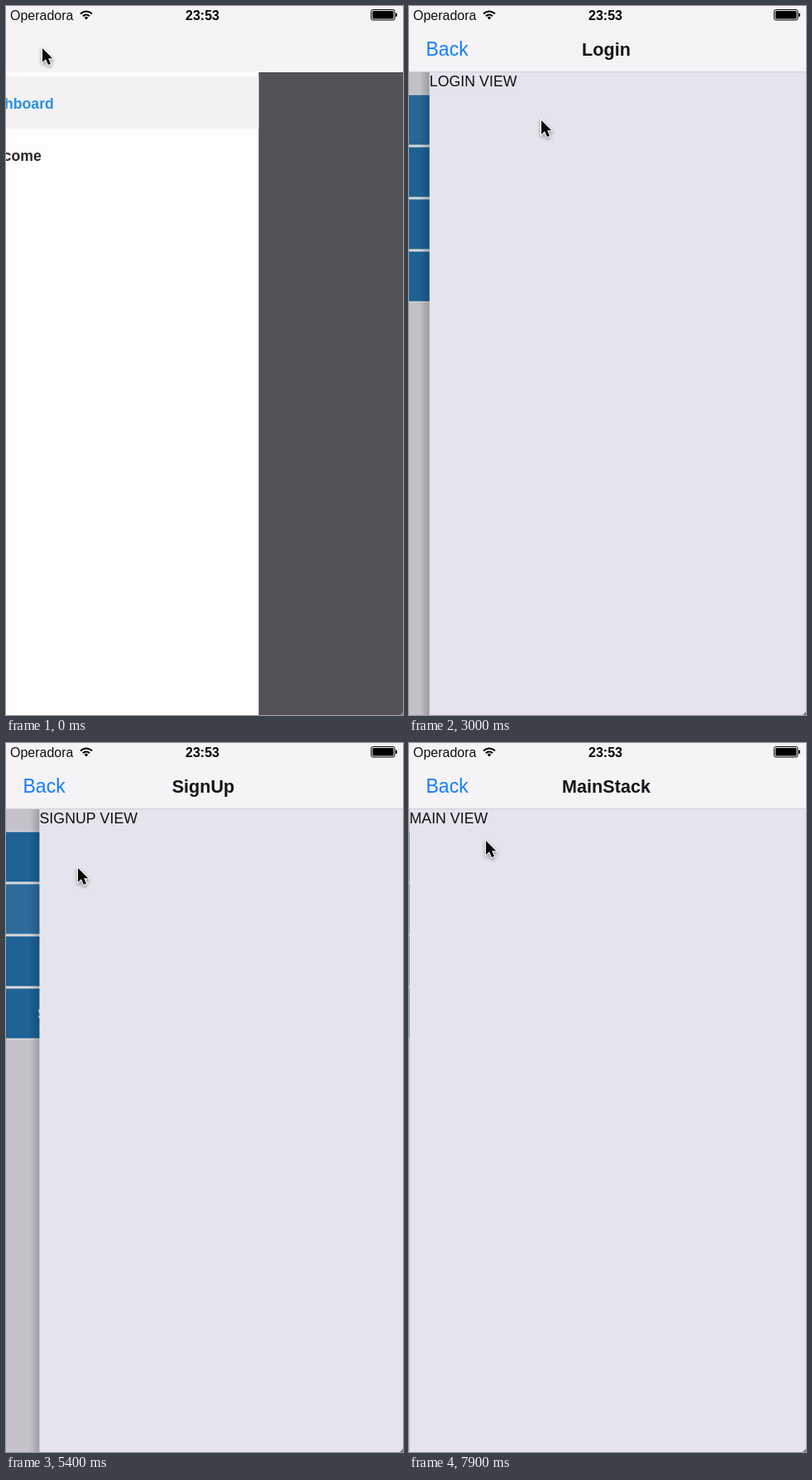
These frames come from a looping animation (480 px wide and 856 px high, 8 s). An HTML page with a canvas:

```html
<!DOCTYPE html>
<html lang="en">
<head>
<meta charset="utf-8">
<title>Navigation demo</title>
<style>
  html, body { margin: 0; width: 100%; height: 100%; overflow: hidden; }
  canvas { display: block; width: 480px; height: 856px; }
</style>
</head>
<body>
<canvas id="stage" width="480" height="856"></canvas>
<script>
const ctx = document.getElementById('stage').getContext('2d');
const W = 480, H = 856, TOP = 80, LOOP = 8000, STEP = 100;
const FONT = '"Liberation Sans", Arial, sans-serif';
const BG = '#e5e4ec', BLUE = '#2372af', BAR = '#f5f3f6';
const MENU_WIDTH = 360, MENU_CLOSE = 1310, WELCOME_AT = 1000;

const buttons = [
  { label: 'Login', tap: 2480 },
  { label: 'SignUp', tap: 5000 },
  { label: 'Content', tap: 7230 },
  { label: 'SetupSignUp', tap: Infinity }
];

const moves = [
  { at: 2664, title: 'Login', text: 'LOGIN VIEW', push: true },
  { at: 3770, title: 'Login', text: 'LOGIN VIEW', push: false },
  { at: 5107, title: 'SignUp', text: 'SIGNUP VIEW', push: true },
  { at: 6243, title: 'SignUp', text: 'SIGNUP VIEW', push: false },
  { at: 7240, title: 'MainStack', text: 'MAIN VIEW', push: true }
];

// time, x, y of the pointer tip
const pointerPath = [
  [0, 44, 51], [200, 47, 62], [750, 72, 178], [1850, 72, 178],
  [2200, 166, 142], [2900, 162, 139], [3000, 160, 138], [3300, 89, 76],
  [3600, 12, 55], [3900, 12, 55], [4600, 95, 208], [4700, 95, 211],
  [4950, 97, 206], [5150, 97, 206], [5400, 87, 151], [5800, 45, 39],
  [6400, 45, 39], [6700, 122, 224], [7050, 132, 258], [7300, 132, 258],
  [7900, 93, 118]
];

const clamp = v => Math.max(0, Math.min(1, v));

// Critically damped spring: remaining distance, from 1 to 0
function settle(ms, rate = 14) {
  const s = Math.max(0, ms) / 1000 * rate;
  return (1 + s) * Math.exp(-s);
}

function rect(color, x, y, w, h) {
  ctx.fillStyle = color;
  ctx.fillRect(x, y, w, h);
}

function roundRect(color, x, y, w, h, r) {
  ctx.fillStyle = color;
  ctx.beginPath();
  ctx.roundRect(x, y, w, h, r);
  ctx.fill();
}

function text(str, x, y, size, color, weight = 400, align = 'left') {
  ctx.font = `${weight} ${size}px ${FONT}`;
  ctx.textAlign = align;
  ctx.fillStyle = color;
  ctx.fillText(str, x, y);
}

function withAlpha(alpha, draw) {
  ctx.save();
  ctx.globalAlpha = alpha;
  draw();
  ctx.restore();
}

function drawWelcome(t, x) {
  ctx.save();
  ctx.translate(x, 0);
  buttons.forEach(({ label, tap }, i) => {
    const y = 107.5 + i * 63;
    const press = t >= tap ? 0.6 * Math.exp((tap - t) / 200) : 0;
    withAlpha(1 - press, () => {
      roundRect('#fff', 24, y - 1.5, 430, 63, 13);
      roundRect(BLUE, 25, y, 428, 60, 12);
      text(label, 238.5, y + 36.5, 17.7, '#f1f5f9', 700, 'center');
    });
  });
  ctx.restore();
}

function drawDetail(move, x) {
  const shadow = ctx.createLinearGradient(x - 12, 0, x, 0);
  shadow.addColorStop(0, 'rgba(0,0,0,0)');
  shadow.addColorStop(1, 'rgba(0,0,0,.2)');
  rect(shadow, x - 12, TOP, 12, H - TOP);
  rect(BG, x, TOP, W, H - TOP);
  text(move.text, x, 97, 17.8, '#111');
}

function drawPages(t, move) {
  rect(BG, 0, TOP, W, H - TOP);
  let cover = 0;
  if (move) {
    const rest = settle(t - move.at);
    cover = move.push ? 1 - rest : rest;
  }
  if (t >= WELCOME_AT) drawWelcome(t, -0.33 * W * cover);
  if (cover > 0.0008) {
    rect(`rgba(0,0,0,${0.16 * cover})`, 0, TOP, W, H - TOP);
    drawDetail(move, W * (1 - cover));
  }
}

function drawMenu(t) {
  const open = t < MENU_CLOSE ? 1 - settle(t + 240) : settle(t - MENU_CLOSE, 9);
  if (open < 0.003) return;
  const left = MENU_WIDTH * (open - 1);
  rect(`rgba(0,0,4,${0.76 * open})`, 0, TOP, W, H - TOP);
  rect('#fefdfe', left, TOP, MENU_WIDTH, H - TOP);
  const selected = t < WELCOME_AT ? 0 : 1;
  ['Dashboard', 'Welcome'].forEach((label, i) => {
    const y = 85 + i * 63, active = i === selected;
    if (active) rect('#f2f1f3', left, y, MENU_WIDTH, 63);
    text(label, left + 20, y + 38.5, 17.7, active ? '#2b8fe3' : '#29292c', 700);
  });
}

function drawTitle(title, back, alpha) {
  withAlpha(alpha, () => {
    text(title, 238.5, 59.5, 21.6, '#151518', 700, 'center');
    text(back ? 'Back' : 'menu', 20.5, 60, 23, '#147efb');
  });
}

function drawStatus() {
  text('Operadora', 5, 16.5, 16, '#111');
  text('23:53', 237.5, 16.5, 16, '#000', 700, 'center');
  ctx.strokeStyle = '#000';
  ctx.lineWidth = 2;
  for (const r of [5.5, 9.5]) {
    ctx.beginPath();
    ctx.arc(97, 16, r, -Math.PI * 0.76, -Math.PI * 0.24);
    ctx.stroke();
  }
  ctx.fillStyle = '#000';
  ctx.beginPath();
  ctx.moveTo(97, 16.5);
  ctx.arc(97, 16, 3, -Math.PI * 0.76, -Math.PI * 0.24);
  ctx.fill();
  ctx.lineWidth = 1;
  ctx.beginPath();
  ctx.roundRect(441.5, 4.5, 28.5, 12.5, 2);
  ctx.stroke();
  roundRect('#000', 443, 6, 25.5, 9.5, 1);
  roundRect('#000', 471, 8.5, 1.8, 4.5, 1);
}

function drawHeader(t, move) {
  rect(BAR, 0, 0, W, TOP);
  if (t >= WELCOME_AT) {
    rect('#cfced3', 0, 79, W, 1);
    const fade = clamp((t - (move ? move.at : WELCOME_AT - 100)) / 250);
    const detail = !move ? 0 : move.push ? fade : 1 - fade;
    const home = move ? 1 - detail : fade;
    if (home > 0) drawTitle('welcome', false, home);
    if (detail > 0) drawTitle(move.title, true, detail);
  }
  drawStatus();
}

function pointerAt(t) {
  const next = pointerPath.findIndex(([time]) => time > t);
  if (next < 0) return pointerPath[pointerPath.length - 1].slice(1);
  const [t0, x0, y0] = pointerPath[next - 1], [t1, x1, y1] = pointerPath[next];
  const u = (t - t0) / (t1 - t0);
  return [x0 + (x1 - x0) * u, y0 + (y1 - y0) * u];
}

function drawPointer(t) {
  ctx.save();
  ctx.translate(...pointerAt(t));
  ctx.beginPath();
  [[0, 0], [0, 17], [4, 13.3], [7, 20], [10, 18.7], [7.2, 12.3], [12.3, 12.3]]
    .forEach(([x, y]) => ctx.lineTo(x, y));
  ctx.closePath();
  ctx.shadowColor = 'rgba(0,0,0,.45)';
  ctx.shadowBlur = 4;
  ctx.shadowOffsetY = 2;
  ctx.lineWidth = 2;
  ctx.strokeStyle = '#fff';
  ctx.stroke();
  ctx.shadowColor = 'transparent';
  ctx.fillStyle = '#0a0a0a';
  ctx.fill();
  ctx.restore();
}

function drawCorner() {
  ctx.fillStyle = '#77767c';
  ctx.beginPath();
  ctx.moveTo(W, H - 4);
  ctx.lineTo(W, H);
  ctx.lineTo(W - 4, H);
  ctx.fill();
}

function render(t) {
  const move = moves.filter(m => m.at <= t).pop();
  drawPages(t, move);
  drawMenu(t);
  drawHeader(t, move);
  drawCorner();
  drawPointer(t);
}

const start = performance.now();
function tick() {
  const t = (performance.now() - start) % LOOP;
  render(Math.floor(t / STEP) * STEP);
  requestAnimationFrame(tick);
}
tick();
</script>
</body>
</html>
```
